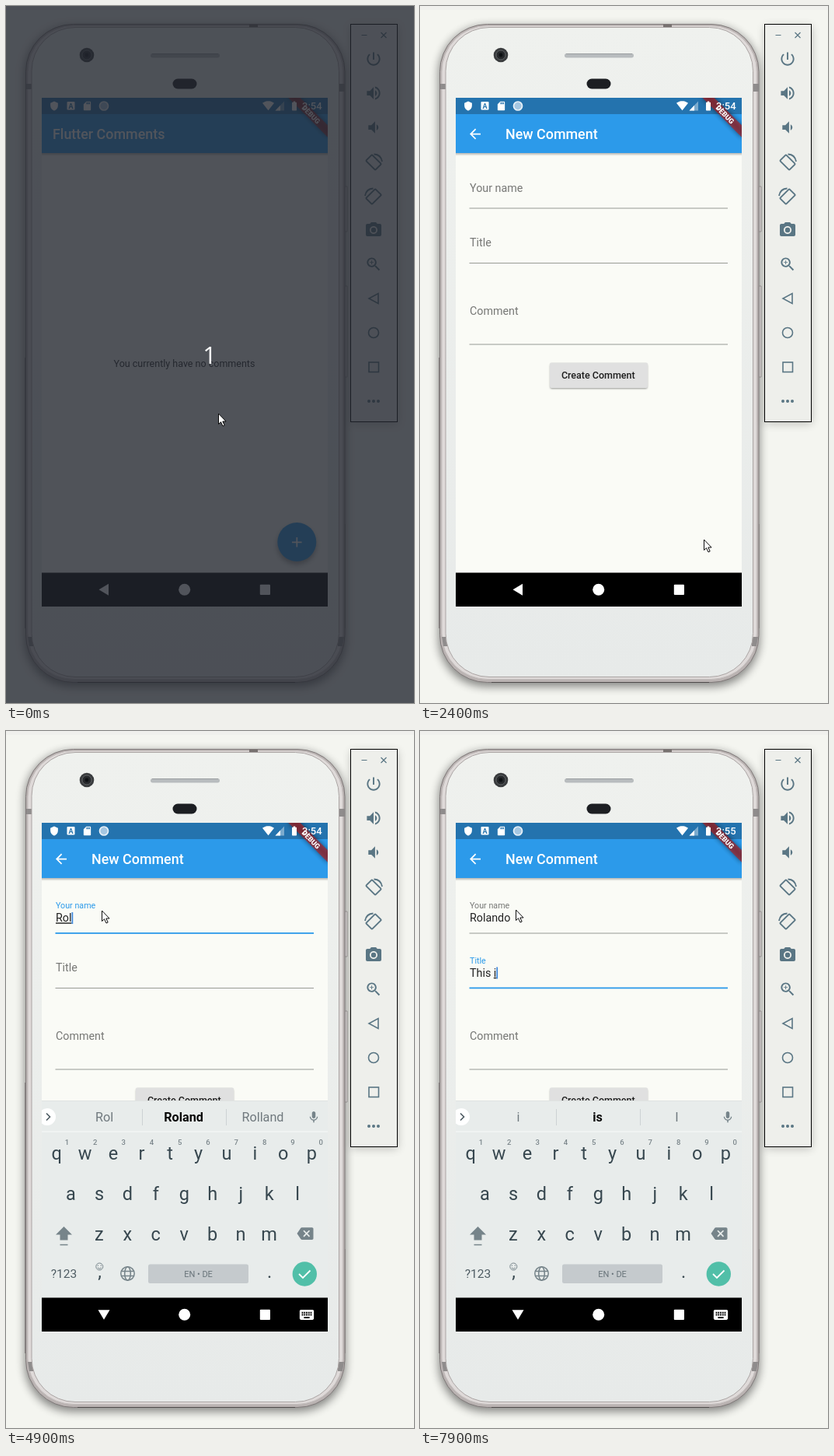
These frames come from a looping animation (525 by 896 pixels, 8 s). An HTML page:

```html
<!DOCTYPE html>
<html lang="en">
<head>
<meta charset="utf-8">
<title>New comment</title>
<style>
  html, body { margin: 0; width: 100%; height: 100%; overflow: hidden; background: #f4f5f0; }
  svg { display: block; width: 525px; height: 896px; }
  text { font-family: Roboto, sans-serif; white-space: pre; }
  .mid { text-anchor: middle; }
  .bar { font-size: 17.9px; font-weight: 500; fill: #fff; }
  .field { font-size: 14.3px; fill: #212121; }
  .grey { fill: #767775; }
  .small { font-size: 12.5px; }
  .key { font-size: 23.5px; fill: #37474f; }
  .num { font-size: 9.5px; font-weight: 500; fill: #7b868b; }
  .sug { font-size: 16.2px; fill: #70797e; }
  .sug.bold { font-weight: 700; fill: #0a0a0a; }
  .word { text-decoration: underline; text-decoration-skip-ink: none; }
  .line { fill: none; stroke: #5a7684; stroke-width: 1.6; }
</style>
</head>
<body>
<svg viewBox="0 0 525 896">
  <defs>
    <clipPath id="screen"><rect x="46" y="118" width="368" height="611"/></clipPath>
    <linearGradient id="face" x2="0" y2="1">
      <stop offset="0" stop-color="#eff1ee"/><stop offset="1" stop-color="#e7eae9"/>
    </linearGradient>
    <filter id="soft" x="-20%" y="-20%" width="140%" height="140%"><feGaussianBlur stdDeviation="6"/></filter>
    <filter id="blur" x="-50%" y="-50%" width="200%" height="200%"><feGaussianBlur stdDeviation="3"/></filter>
    <filter id="thin" x="-20%" y="-40%" width="140%" height="180%"><feGaussianBlur stdDeviation="1.2"/></filter>
  </defs>

  <rect width="525" height="896" fill="#f4f5f0"/>
  <rect width="525" height="5" fill="#f0f0ed"/>

  <g id="phone">
    <rect x="24" y="26" width="413" height="849" rx="61" opacity=".45" filter="url(#soft)"/>
    <path d="M436 232h3v58h-3zM436 360h3v117h-3z" fill="#d2cecd" stroke="#8d8888" stroke-width=".8"/>
    <rect x="25.5" y="23.5" width="410.5" height="846" rx="61" fill="#bab3b2" stroke="#7f7979"/>
    <rect x="28" y="25.500" width="405.500" height="840" rx="59" fill="#dfdad9" stroke="#c3bdbc"/>
    <path d="M26 100h7v7h-7zM428 100h8v10h-8zM28 811h7v12h-5zM427 811h8l-2 12h-6z" fill="#8f8c8c"/>
    <path d="M313 24h11v4h-11z" fill="#77716f"/>
    <rect x="33" y="27.5" width="395.5" height="835" rx="56" fill="url(#face)" stroke="#aaa4a3"/>
    <path d="M24.5 452V800M436.5 666V800" stroke="#8b8585"/>
    <path d="M92 869.5H372" stroke="#4f4b4b"/>
    <circle cx="104" cy="63" r="9.3" fill="#3a3c3e"/>
    <circle cx="104" cy="63" r="6" fill="#26282b" stroke="#606466"/>
    <circle cx="104" cy="63" r="2.4" fill="#0d1013"/>
    <rect x="186" y="61" width="89" height="5.5" rx="2.7" fill="#b8bcbe"/>
    <path d="M188 61.5H273" stroke="#9b9fa1"/>
    <rect x="214.5" y="93.5" width="31" height="13" rx="6.5" fill="#1c1e22"/>
  </g>

  <g clip-path="url(#screen)">
    <g id="home">
      <rect x="46" y="118" width="368" height="612" fill="#fafbf6"/>
      <g class="appbar"></g>
      <text class="bar" x="60" y="171">Flutter Comments</text>
      <text class="small mid" x="229.5" y="463.5" fill="#2b2b2b">You currently have no comments</text>
      <circle cx="374" cy="693" r="25" opacity=".35" filter="url(#blur)"/>
      <circle cx="374.3" cy="689" r="25" fill="#2c9aea"/>
      <circle id="ripple" cx="374.3" cy="689" r="19" fill="#fff" opacity=".2"/>
      <path d="M368 689.3h12.6M374.3 683v12.6" stroke="#fff" stroke-width="1.7"/>
    </g>

    <g id="form">
      <rect x="46" y="118" width="368" height="612" fill="#fafbf6"/>
      <g class="appbar"></g>
      <g id="backArrow"></g>
      <text class="bar" x="110" y="171">New Comment</text>
      <rect id="nameLine" x="63.5" width="332.5"/>
      <rect id="titleLine" x="63.5" width="332.5"/>
      <rect x="63.5" y="434.5" width="332.5" height="1" fill="#989a96"/>
      <text class="field" id="nameLabel">Your name</text>
      <text class="field" id="titleLabel">Title</text>
      <text class="field grey" x="64" y="397">Comment</text>
      <text class="field grey" id="hint" x="64" y="245.3">Who are you?</text>
      <text class="field" id="nameText" x="64" y="245.3"><tspan></tspan><tspan class="word"></tspan></text>
      <text class="field" id="titleText" x="64" y="315.8"><tspan></tspan><tspan class="word"></tspan></text>
      <rect id="caret" width="1.8" height="15" fill="#4189dc"/>
      <rect x="167.5" y="460" width="125" height="32" rx="2" opacity=".4" filter="url(#thin)"/>
      <rect x="167" y="458.5" width="126" height="32.5" rx="2" fill="#e0e0e0"/>
      <text class="small mid" x="229.3" y="479" font-weight="500" fill="#1d1d1d">Create Comment</text>
    </g>

    <g id="keyboard">
      <rect x="46" y="475" width="368" height="256" fill="#e8eceb"/>
      <path d="M46 475.5H414" stroke="#dfe3e2"/>
      <path d="M46 515H414" stroke="#f3f6f5" stroke-width="1.5"/>
      <circle cx="53" cy="496" r="11" fill="#fff"/>
      <path d="M52 491.5l4.5 4.5-4.5 4.5" fill="none" stroke="#4c5a61" stroke-width="1.6"/>
      <path d="M175.5 486v21M283.5 486v21" stroke="#cdd2d4"/>
      <text class="sug mid" x="126.5" y="502"></text>
      <text class="sug mid" x="228.5" y="502"></text>
      <text class="sug mid" x="330.5" y="502"></text>
      <g id="keys"></g>
      <path d="M74.5 637l10.5 10.5h-5.5v7h-10v-7h-5.5z" fill="#76848a"/>
      <path d="M69.5 660.5h10" stroke="#76848a" stroke-width="1.5"/>
      <text class="mid" x="74.5" y="703" font-size="15.5" fill="#4e5c63">?123</text>
      <text class="key mid" x="120.5" y="703">,</text>
      <g fill="none" stroke="#76848a">
        <circle cx="120.3" cy="688.5" r="4.5"/>
        <path d="M117.8 690q2.5 2.5 5 0M118.3 686.5v1.5M122.3 686.5v1.5"/>
        <g stroke-width="1.5">
          <circle cx="156.5" cy="697.5" r="8.7"/>
          <ellipse cx="156.5" cy="697.5" rx="3.8" ry="8.7"/>
          <path d="M148.5 694.5h16M148.5 700.5h16"/>
        </g>
      </g>
      <rect x="183" y="685.5" width="129" height="24.5" rx="2.5" fill="#c5cacd"/>
      <text class="mid" x="247.5" y="702" font-size="11" fill="#69747a">EN • DE</text>
      <text class="key mid" x="339" y="703">.</text>
      <circle cx="384.3" cy="698" r="15.7" fill="#51bfa8"/>
      <path d="M377 698l5 5 9.5-9.5" fill="none" stroke="#fff" stroke-width="1.8"/>
    </g>

    <g transform="translate(414 118) rotate(45)">
      <rect x="-36" y="25" width="72" height="10.8" opacity=".5" filter="url(#blur)"/>
      <rect x="-36" y="25" width="72" height="10.8" fill="#b71c1c" opacity=".63"/>
      <text class="mid" y="33.7" font-size="9.1" font-weight="900" fill="#fff">DEBUG</text>
    </g>
    <g id="status" fill="#fff">
      <rect x="78.5" y="123" width="10" height="10.5" rx="1"/>
      <text class="mid" x="83.5" y="131.8" font-size="9" font-weight="700" fill="#2473ae">A</text>
      <circle cx="126" cy="128.5" r="5.5" fill="#a5c7e2" stroke="#e8f1f8" stroke-width="1.7"/>
      <path d="M358 122.5V134.5H346.5z" opacity=".4"/>
      <path d="M353 127.7V134.5H346.5z"/>
      <text id="clock" x="381" y="133.2" font-size="13" font-weight="500"></text>
    </g>
  </g>

  <rect x="46" y="728.5" width="368" height="43.5"/>
  <g fill="#fff">
    <path id="back" d="M-6.5 0L6 -7.5V7.5z"/>
    <circle cx="229.7" cy="750.3" r="7.5"/>
    <rect x="326.8" y="743.8" width="13.2" height="13.2" rx="1"/>
    <g id="imeIcon"></g>
  </g>

  <g id="panel">
    <rect x="444" y="26" width="60" height="511" opacity=".22" filter="url(#soft)"/>
    <rect x="443.5" y="23.5" width="60" height="511" fill="#eeefeb" stroke="#000"/>
    <path class="line" style="stroke-width:1.2" d="M457.5 37.5h7M482.5 34l7 7M489.5 34l-7 7"/>
    <g class="line" id="turn" style="stroke-width:1.9">
      <rect x="-8.5" y="-5.5" width="17" height="11" rx="1" transform="translate(473 201) rotate(45)"/>
      <path d="M473.5 190.5q9 .5 10.5 9.5"/>
    </g>
    <use href="#turn" transform="translate(946 44) scale(-1 1)"/>
    <path class="line" d="M479 369.5V382.5L467 376z"/>
    <circle class="line" cx="473" cy="420" r="6.5"/>
    <rect class="line" x="467" y="458" width="12.5" height="12.5"/>
    <path d="M467 508h.01M473 508h.01M479 508h.01" stroke="#5a7684" stroke-width="4" stroke-linecap="round"/>
  </g>

  <g id="dim">
    <rect width="525" height="896" fill="#232730" opacity=".79"/>
    <text class="mid" x="262" y="459.5" font-size="31" fill="#fff" style="font-family:'Open Sans',sans-serif">1</text>
  </g>
  <path id="mouse" d="M0 0V13.5L3 10.7 5.5 16 7.7 15 5.3 10H9.6z" fill="#fff" stroke="#000" stroke-width=".95"/>
</svg>

<script>
const $ = id => document.getElementById(id);
const LOOP = 8000, STEP = 100;

const icons = {
  power: 'M13 3h-2v10h2V3zm4.83 2.17l-1.42 1.42C17.99 7.86 19 9.81 19 12c0 3.87-3.13 7-7 7s-7-3.13-7-7c0-2.19 1.01-4.14 2.58-5.42L6.17 5.17C4.23 6.82 3 9.26 3 12c0 4.97 4.03 9 9 9s9-4.03 9-9c0-2.74-1.23-5.18-3.17-6.83z',
  loud: 'M3 9v6h4l5 5V4L7 9H3zm13.5 3c0-1.77-1.02-3.29-2.5-4.03v8.05c1.48-.73 2.5-2.25 2.5-4.02zM14 3.23v2.06c2.89.86 5 3.54 5 6.71s-2.11 5.85-5 6.71v2.06c4.01-.91 7-4.49 7-8.77s-2.99-7.86-7-8.77z',
  quiet: 'M18.5 12c0-1.77-1.02-3.29-2.5-4.03v8.05c1.48-.73 2.5-2.25 2.5-4.02zM5 9v6h4l5 5V4L9 9H5z',
  camera: 'M9 2L7.17 4H4c-1.1 0-2 .9-2 2v12c0 1.1.9 2 2 2h16c1.1 0 2-.9 2-2V6c0-1.1-.9-2-2-2h-3.17L15 2H9zm3 15c-2.76 0-5-2.24-5-5s2.24-5 5-5 5 2.24 5 5-2.24 5-5 5zM8.8 12a3.2 3.2 0 1 0 6.4 0a3.2 3.2 0 1 0-6.4 0z',
  zoom: 'M15.5 14h-.79l-.28-.27C15.41 12.59 16 11.11 16 9.5 16 5.91 13.09 3 9.5 3S3 5.91 3 9.5 5.91 16 9.5 16c1.61 0 3.09-.59 4.23-1.57l.27.28v.79l5 4.99L20.49 19l-4.99-5zm-6 0C7.01 14 5 11.99 5 9.5S7.01 5 9.5 5 14 7.01 14 9.5 11.99 14 9.5 14zm2.5-4h-2v2H9v-2H7V9h2V7h1v2h2v1z',
  arrow: 'M20 11H7.83l5.59-5.59L12 4l-8 8 8 8 1.41-1.41L7.83 13H20v-2z',
  mic: 'M12 14c1.66 0 2.99-1.34 2.99-3L15 5c0-1.66-1.34-3-3-3S9 3.34 9 5v6c0 1.66 1.34 3 3 3zm5.3-3c0 3-2.54 5.1-5.3 5.1S6.7 14 6.7 11H5c0 3.41 2.72 6.23 6 6.72V21h2v-3.28c3.28-.48 6-3.3 6-6.72h-1.7z',
  erase: 'M22 3H7c-.69 0-1.23.35-1.59.88L0 12l5.41 8.11c.36.53.9.89 1.59.89h15c1.1 0 2-.9 2-2V5c0-1.1-.9-2-2-2zm-3 12.59L17.59 17 14 13.41 10.41 17 9 15.59 12.59 12 9 8.41 10.41 7 14 10.59 17.59 7 19 8.41 15.41 12 19 15.59z',
  keyboard: 'M20 5H4c-1.1 0-1.99.9-1.99 2L2 17c0 1.1.9 2 2 2h16c1.1 0 2-.9 2-2V7c0-1.1-.9-2-2-2zm-9 3h2v2h-2V8zm0 3h2v2h-2v-2zM8 8h2v2H8V8zm0 3h2v2H8v-2zm-1 2H5v-2h2v2zm0-3H5V8h2v2zm9 7H8v-2h8v2zm0-4h-2v-2h2v2zm0-3h-2V8h2v2zm3 3h-2v-2h2v2zm0-3h-2V8h2v2z',
  shield: 'M12 1L3 5v6c0 5.55 3.84 10.74 9 12 5.16-1.26 9-6.45 9-12V5l-9-4z',
  card: 'M18 2h-8L4.02 8 4 20c0 1.1.9 2 2 2h12c1.1 0 2-.9 2-2V4c0-1.1-.9-2-2-2zm-6 6h-2V4h2v4zm3 0h-2V4h2v4zm3 0h-2V4h2v4z',
  wifi: 'M12 21.5L23.64 7c-.45-.34-4.93-4-11.64-4C5.28 3 .81 6.66.36 7z',
  battery: 'M15.67 4H14V2h-4v2H8.33C7.6 4 7 4.6 7 5.33v15.33C7 21.4 7.6 22 8.33 22h7.33c.74 0 1.34-.6 1.34-1.33V5.33C17 4.6 16.4 4 15.67 4z'
};
const add = (el, html) => el.insertAdjacentHTML('beforeend', html);
function icon(parent, name, x, y, size, fill) {
  add($(parent), `<path d="${icons[name]}" fill="${fill}" fill-rule="evenodd"
    transform="translate(${x - size / 2} ${y - size / 2}) scale(${size / 24})"/>`);
}

['power', 'loud', 'quiet'].forEach((name, i) => icon('panel', name, 473, 68 + 44 * i, 23, '#5a7684'));
icon('panel', 'camera', 473, 288, 24, '#5a7684');
icon('panel', 'zoom', 473, 332, 23, '#5a7684');
icon('backArrow', 'arrow', 71, 164.5, 21, '#fff');
icon('keyboard', 'mic', 396, 496.5, 18, '#76848a');
icon('keyboard', 'erase', 385, 646, 21, '#76848a');
icon('imeIcon', 'keyboard', 387, 750.5, 22, '#fff');
icon('status', 'shield', 62, 128.5, 13, '#fff');
icon('status', 'card', 104.5, 128.5, 14, '#fff');
icon('status', 'wifi', 337.5, 128, 15.5, '#fff');
icon('status', 'battery', 371, 128.5, 14.5, '#fff');

for (const bar of document.querySelectorAll('.appbar')) {
  add(bar, `<rect x="40" y="141" width="380" height="50" opacity=".25" filter="url(#thin)"/>
    <rect x="46" y="118" width="368" height="71" fill="#2c9aea"/>
    <rect x="46" y="118" width="368" height="21" fill="#2473ae"/>`);
}

[['qwertyuiop', 65.2, 551], ['asdfghjkl', 83.5, 602.5], ['zxcvbnm', 119.8, 654.5]].forEach(([row, x, y]) =>
  [...row].forEach((c, i) => add($('keys'), `<text class="key mid" x="${x + 36.45 * i}" y="${y}">${c}</text>`)));
[...'1234567890'].forEach((c, i) =>
  add($('keys'), `<text class="num mid" x="${78.5 + 36.3 * i}" y="531.5">${c}</text>`));

const letters = document.querySelectorAll('.key');
const slots = document.querySelectorAll('.sug');

// time, name, title, suggestions (* marks the bold one)
const typing = [
  [0, '', '', 'die ich mit'],
  [4600, 'R', '', 'R *Re Ro'],
  [4800, 'Ro', '', 'Ro *Rot Rom'],
  [4900, 'Rol', '', 'Rol *Roland Rolland'],
  [5300, 'Rolan', '', 'Rolan *Roland Rolandine'],
  [5600, 'Roland', '', 'Roland *Rolando Rolands'],
  [6000, 'Rolando', '', 'Roland *Rolando Rolands'],
  [6200, 'Rolando', '', 'die ich mit'],
  [7100, 'Rolando', 'T', 'T *The To'],
  [7300, 'Rolando', 'Th', 'Th *The That'],
  [7400, 'Rolando', 'Thi', 'Thi *This Think'],
  [7500, 'Rolando', 'This', 'Thus *This Thistle'],
  [7700, 'Rolando', 'This ', 'is was one'],
  [7900, 'Rolando', 'This i', 'i *is I']
];
const pointer = [
  [800, 273.5, 524], [900, 346, 648], [1000, 346, 648], [1100, 360, 676], [1200, 365.5, 686],
  [2800, 365.5, 686], [2900, 356, 650], [3000, 312, 540], [3100, 243, 410], [3200, 178, 310],
  [3300, 130, 255], [3400, 111.5, 238], [3500, 123.5, 231], [7400, 123.5, 231], [7500, 123.5, 230]
];
const nameFloat = [[3700, 0], [3800, .3], [3900, .75], [4000, 1]];
const titleFloat = [[6100, 0], [6200, .4], [6300, .9], [6400, .9], [6500, 1]];
const keyboardTop = [[4200, 254], [4300, 150], [4400, 36], [4500, 0]];
const pageIn = [[1300, 0], [1400, .17], [1500, .5], [1600, .85], [1700, 1]];

// Linear interpolation through [time, ...values] points.
function at(points, t) {
  const i = points.findIndex(p => p[0] > t);
  if (i === 0) return points[0].slice(1);
  if (i < 0) return points[points.length - 1].slice(1);
  const [a, b] = [points[i - 1], points[i]];
  const k = (t - a[0]) / (b[0] - a[0]);
  return a.slice(1).map((v, j) => v + (b[j + 1] - v) * k);
}
const mix = (a, b, k) => `rgb(${a.map((v, i) => Math.round(v + (b[i] - v) * k))})`;
const move = (id, x, y, rest = '') => $(id).setAttribute('transform', `translate(${x} ${y}) ${rest}`);
const show = (id, on) => $(id).style.display = on ? '' : 'none';
const BLUE = [44, 154, 234];

function field(id, floated, focus, y) {
  const label = $(id + 'Label'), line = $(id + 'Line');
  move(id + 'Label', 64, y - 10.5 * floated, `scale(${1 - .25 * floated})`);
  label.style.fill = mix([118, 119, 117], BLUE, focus);
  line.setAttribute('y', y + 21 - focus * .5);
  line.setAttribute('height', 1 + focus * .8);
  line.style.fill = mix([152, 154, 150], BLUE, focus);
}

function write(id, value, active) {
  const cut = active ? value.lastIndexOf(' ') + 1 : value.length;
  const [plain, word] = $(id).children;
  plain.textContent = value.slice(0, cut);
  word.textContent = value.slice(cut);
}

function render(t) {
  const [, name, title, words] = typing.filter(c => c[0] <= t).pop();
  const onTitle = t >= 6200;

  show('dim', t < 500);
  move('mouse', ...at(pointer, t));
  show('ripple', t >= 1200);

  const [page] = at(pageIn, t);
  show('form', page > 0);
  $('form').style.opacity = page;
  move('form', 0, 152 * (1 - page) ** 2);

  const [nf] = at(nameFloat, t), [tf] = at(titleFloat, t);
  field('name', nf, nf * (1 - tf), 238.5);
  field('title', tf, tf, 309);
  show('hint', nf > 0 && !name);
  $('hint').style.opacity = nf;
  write('nameText', name, !onTitle);
  write('titleText', title, onTitle);

  show('caret', t >= 3900 && !(t >= 6600 && t < 7000));
  const typed = $(onTitle ? 'titleText' : 'nameText');
  const width = (onTitle ? title : name) ? typed.getComputedTextLength() : 0;
  move('caret', 64 + width, onTitle ? 303.5 : 233);

  const ime = t >= 3900;
  move('back', 126, 750.3, ime ? 'rotate(-90)' : '');
  show('imeIcon', ime);
  show('keyboard', t >= 4300);
  move('keyboard', 0, at(keyboardTop, t)[0]);

  const upper = t < 4700 || (t >= 7000 && t < 7200);
  for (const el of letters) {
    const c = el.textContent;
    el.textContent = upper ? c.toUpperCase() : c.toLowerCase();
  }
  words.split(' ').forEach((w, i) => {
    slots[i].textContent = w.replace('*', '');
    slots[i].classList.toggle('bold', w[0] === '*');
  });
  $('clock').textContent = t < 6000 ? '3:54' : '3:55';
}

let start, last;
function tick(now) {
  start ??= now;
  const t = Math.floor((now - start) / STEP) * STEP % LOOP;
  if (t !== last) render(last = t);
  requestAnimationFrame(tick);
}
render(0);
requestAnimationFrame(tick);
</script>
</body>
</html>
```
